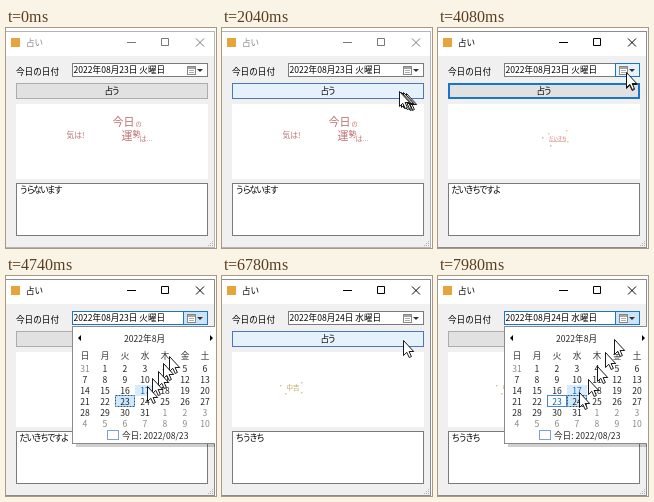
Recreate the animation shown at these times as an HTML page. Size 210 px wide and 220 px high, loop 8 s.

```html
<!DOCTYPE html>
<html lang="ja">
<head>
<meta charset="utf-8">
<style>
html, body { margin: 0; width: 100%; height: 100%; overflow: hidden; background: #fff; }
svg { display: block; width: 210px; height: 220px; }
text { font: 8.6px "Noto Sans CJK JP", "Noto Sans CJK", sans-serif; white-space: pre; }
.mid { text-anchor: middle; }
.kana { letter-spacing: -1.7px; }
</style>
</head>
<body>
<svg id="stage" viewBox="0 0 210 220"></svg>
<script>
const LOOP = 8000, STEP = 60;
const BLUE = '#1a74cc', GREY = '#7a7a7a', HOVER = '#e5f1fb', PRESS = '#cce4f7';
const stage = document.getElementById('stage');

// Pointer tip: time, x, y
const path = [
  [1500, 214, 69], [1560, 206, 69], [1800, 197, 67], [1976, 184, 65], [2040, 177, 63],
  [2220, 179, 65], [3240, 179, 65], [3600, 185, 60], [3900, 188, 46], [4080, 188, 44],
  [4200, 188, 44], [4500, 186, 48], [4660, 168, 72], [4740, 141, 110], [4860, 138, 123],
  [5580, 139, 124], [5696, 154, 106], [5760, 170, 82], [5880, 180, 68], [6240, 181, 64],
  [6960, 181, 64], [7500, 187, 48], [7680, 188, 44], [7840, 188, 45], [7916, 176, 63], [7980, 141, 116]
];

function pointerAt(t) {
  const i = path.findIndex(p => p[0] > t);
  if (i === 0) return path[0].slice(1);
  if (i < 0) return path[path.length - 1].slice(1);
  const [t0, x0, y0] = path[i - 1], [t1, x1, y1] = path[i];
  const k = (t - t0) / (t1 - t0);
  return [x0 + (x1 - x0) * k, y0 + (y1 - y0) * k];
}

const within = (v, from, to) => v >= from && v < to;
const fill = (x, y, w, h, color) => `<rect x="${x}" y="${y}" width="${w}" height="${h}" fill="${color}"/>`;
const box = (x, y, w, h, color, line, extra = '') =>
  `<rect x="${x + .5}" y="${y + .5}" width="${w - 1}" height="${h - 1}" fill="${color}" stroke="${line}" ${extra}/>`;
const line = (d, color, width = 1) => `<path d="${d}" fill="none" stroke="${color}" stroke-width="${width}"/>`;
const shape = (d, color) => `<path d="${d}" fill="${color}"/>`;
const text = (x, y, s, color = '#000', cls = '', size = 8.6) =>
  `<text x="${x}" y="${y}" fill="${color}" class="${cls}" style="font-size:${size}px">${s}</text>`;

function frame(active) {
  const ink = active ? '#000' : '#777';
  let out = box(-1, 3, 210, 217, '#f0f0f0', active ? '#8c8c8c' : '#b4b4b4') + fill(0, 4, 208, 24, '#fff')
    + fill(5, 10, 9, 9, '#e5a53c') + text(20, 17.5, '占い', active ? '#000' : '#888')
    + line('M121 14.5h9M155.5 10.5h7v7h-7zM190 10.5l8 8m0-8l-8 8', ink);
  for (let i = 0; i < 3; i++)
    for (let j = 0; j <= i; j++) out += fill(206 - 2 * j, 213 + 2 * i, 1, 1, '#b0b0b0');
  return out;
}

function dateField(s) {
  const edge = s.fieldFocus ? BLUE : GREY;
  let out = text(10, 47, '今日の日付') + box(66, 35, 136, 14, '#fff', edge);
  const picked = s.fieldFocus && !s.open;
  if (picked) out += fill(67, 37, 19, 10, BLUE);
  const year = picked ? '<tspan fill="#fff">2022</tspan>' : '2022';
  out += text(67.5, 45.2, `${year}年08月${s.day}日 ${s.day === 23 ? '火' : '水'}曜日`);
  if (s.open || s.dropHover) out += box(177, 35, 25, 14, s.open ? PRESS : HOVER, BLUE);
  return out + box(181, 38, 9, 9, '#fff', '#888') + fill(182, 39, 7, 2, '#a5a5a5')
    + line('M183 42.5h5M183 44.5h5', '#aaa') + shape('M191 41h6l-3 3z', '#333');
}

function button(s) {
  const look = s.pressed ? [PRESS, '#005499'] : s.buttonHover ? [HOVER, '#4a78c0']
    : ['#e1e1e1', s.buttonFocus ? BLUE : '#adadad'];
  let out = box(10, 55, 192, 16, ...look);
  if (s.buttonFocus && !s.buttonHover) out += box(11, 56, 190, 14, 'none', BLUE);
  return out + text(98.5, 65.7, '占う', '#000', 'kana');
}

const dots = (color, ...points) => points.map(([x, y]) => fill(x, y, 1.5, 1.5, color)).join('');

function picture(result) {
  const red = '#bd7070';
  const art = [
    text(106.5, 97.5, '今日', red, '', 11) + text(129.5, 98, 'の', red, '', 6)
      + text(115.5, 112, '運', red, '', 11) + text(126.5, 109, '勢', red, '', 8)
      + text(133.5, 113, 'は...', red, '', 7) + text(60.5, 110, '気は!', red, '', 7.8),
    text(111, 112, 'だいきち', '#d46a60', '', 4.4) + line('M111 113.5h17', '#d9908a', .6)
      + dots('#e3b09a', [104, 109], [112, 117]) + dots('#e6cf86', [128, 102], [110, 105], [129, 113]),
    text(64.5, 114.3, '中吉', '#c3a35c', '', 6.5)
      + dots('#d8c597', [58, 109], [79, 106], [63, 117], [79, 116])
  ];
  return fill(10, 76, 192, 75, '#fff') + art[result];
}

function calendar(s, [px, py]) {
  // The right side runs under the edge of the view.
  let out = fill(70, 54, 139, 117, '#00000030') + box(66, 50, 150, 118, '#fff', '#8a8a8a')
    + shape('M75 59v6l-3-3zM204 59v6l3-3z', '#000') + text(138.5, 66, '2022年8月', '#222', 'mid');
  [...'日月火水木金土'].forEach((d, c) => out += text(79 + 20 * c, 83, d, '#333', 'mid'));
  const first = Date.UTC(2022, 6, 31);
  for (let i = 0; i < 42; i++) {
    const c = i % 7, r = Math.floor(i / 7), x = 69 + 20 * c, y = 87 + 11 * r;
    const date = new Date(first + i * 864e5), n = date.getUTCDate();
    const inMonth = date.getUTCMonth() === 7;
    const hover = within(px, x, x + 20) && within(py, y, y + 11);
    const chosen = inMonth && n === s.day, today = inMonth && n === 23;
    if (hover) out += fill(x, y, 20, 11, '#d9ecff');
    if (chosen) out += box(x, y - 1, 20, 12, '#cce8ff', '#26547c', 'stroke-dasharray="2 1"');
    if (today && !chosen) out += box(x, y - 1, 20, 12, 'none', '#4a86cc');
    const color = !inMonth ? '#888' : hover || today && !chosen ? '#0066cc' : '#222';
    out += text(x + 10, y + 8.5, n, color, 'mid');
  }
  return out + box(101, 154, 12, 10, '#fff', '#7f9fd6') + text(116, 162.5, '今日: 2022/08/23', '#222')
    + fill(209, 50, 1, 122, '#fff');
}

function pointer(t) {
  let out = '', last = '';
  for (let k = 4; k >= 0; k--) {
    const at = pointerAt(t - 16 * k).map(Math.round).join(' ');
    if (at !== last) out += `<path transform="translate(${at})" d="M.5 .5v15l3.3-3.2 2.4 5.2 2.2-1-2.3-5h4.6z" fill="#fff" stroke="#000" stroke-width=".9"/>`;
    last = at;
  }
  return out;
}

function scene(t) {
  const tip = pointerAt(t), [x, y] = tip;
  const open = within(t, 4200, 5460) || t >= 7800;
  const s = {
    open,
    day: t < 5460 ? 23 : 24,
    pressed: within(t, 2520, 2580) || within(t, 6720, 6780),
    buttonFocus: within(t, 2520, 4200) || within(t, 6720, 7800),
    fieldFocus: within(t, 4200, 6720) || t >= 7800,
    buttonHover: !open && within(x, 10, 202) && within(y, 55, 71),
    dropHover: within(x, 177, 202) && within(y, 35, 49)
  };
  const result = t < 2580 ? 0 : t < 6780 ? 1 : 2;
  const message = ['うらないます', 'だいきちですよ', 'ちうきち'][result];
  return frame(t >= 2520) + dateField(s) + button(s) + picture(result)
    + box(10, 155, 192, 53, '#fff', GREY) + text(13.5, 165, message, '#000', 'kana')
    + (open ? calendar(s, tip) : '') + pointer(t);
}

let shown = -1;
function tick() {
  const t = Math.floor(performance.now() % LOOP / STEP) * STEP;
  if (t !== shown) stage.innerHTML = scene(shown = t);
  requestAnimationFrame(tick);
}
tick();
</script>
</body>
</html>
```
